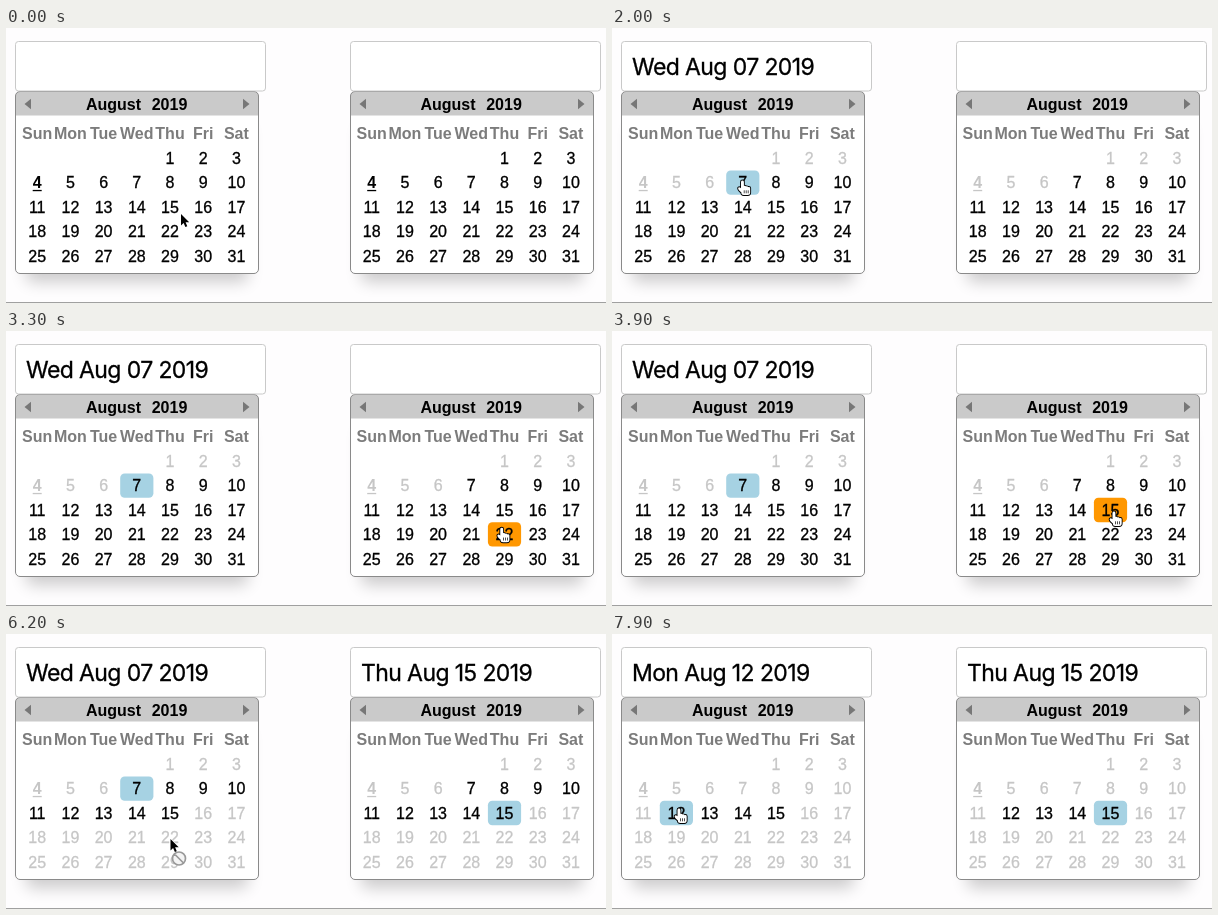
An HTML page with a canvas that plays this animation: 600 px wide and 275 px high, repeating every 8000 ms.

```html
<!DOCTYPE html>
<html lang="en">
<head>
<meta charset="utf-8">
<title>Date range picker</title>
<style>
  html, body { margin: 0; width: 100%; height: 100%; overflow: hidden; background: #fefdfe; }
  canvas { display: block; width: 600px; height: 275px; }
</style>
</head>
<body>
<canvas id="stage" width="600" height="275"></canvas>
<script>
const ctx = document.getElementById('stage').getContext('2d');

const LOOP = 8000, STEP = 100, TRAVEL = 800;
const YEAR = 2019, MONTH = 7, TODAY = 4;
const PANEL_GAP = 334.5;
const GRID = { x: 14.6, y: 118, w: 33.2, h: 24.4 };
const SANS = '"Liberation Sans", Arial, sans-serif';

const dateOf = day => new Date(YEAR, MONTH, day);
const FIRST_COLUMN = dateOf(1).getDay();
const DAYS = dateOf(32).getDate() === 1 ? 31 : 30;

// Each stop is reached at its time after an eased move
const STOPS = [
  { at: 0, x: 175, y: 186 },
  { at: 800, x: 130.5, y: 153.5 },
  { at: 2800, x: 489.5, y: 214 },
  { at: 3700, x: 502, y: 181.5 },
  { at: 4900, x: 183, y: 223 },
  { at: 5800, x: 216, y: 204 },
  { at: 6200, x: 164.5, y: 205 },
  { at: 7400, x: 67, y: 175.5 }
];

const CLICKS = [
  { at: 1400, panel: 0, day: 7 },
  { at: 4200, panel: 1, day: 15 },
  { at: 7700, panel: 0, day: 12 }
];

function pointerAt(t) {
  const next = STOPS.findIndex(stop => stop.at > t);
  if (next < 0) return STOPS[STOPS.length - 1];
  const from = STOPS[next - 1], to = STOPS[next];
  const span = Math.min(TRAVEL, to.at - from.at);
  const k = Math.max(0, 1 - (to.at - t) / span);
  const eased = k * k * (3 - 2 * k);
  return { x: from.x + (to.x - from.x) * eased, y: from.y + (to.y - from.y) * eased };
}

function selectionAt(t) {
  const selected = [0, 0];
  for (const click of CLICKS) if (t >= click.at) selected[click.panel] = click.day;
  return selected;
}

function cellOf(day) {
  const slot = day + FIRST_COLUMN - 1;
  return { x: GRID.x + GRID.w * (slot % 7), y: GRID.y + GRID.h * Math.floor(slot / 7) };
}

function dayUnder({ x, y }, offset) {
  const col = Math.floor((x - offset - GRID.x) / GRID.w);
  const row = Math.floor((y - GRID.y) / GRID.h);
  const day = row * 7 + col - FIRST_COLUMN + 1;
  return col >= 0 && col < 7 && row >= 0 && day > 0 && day <= DAYS ? day : 0;
}

function box(x, y, w, h, r, fill, stroke) {
  ctx.beginPath();
  ctx.roundRect(x, y, w, h, r);
  if (fill) { ctx.fillStyle = fill; ctx.fill(); }
  if (stroke) { ctx.strokeStyle = stroke; ctx.lineWidth = 1; ctx.stroke(); }
}

// A hairline outline thickens the regular weight slightly
function label(text, x, y, font, color, { align = 'center', outline = 0 } = {}) {
  ctx.font = font;
  ctx.fillStyle = ctx.strokeStyle = color;
  ctx.textAlign = align;
  ctx.fillText(text, x, y);
  if (outline) {
    ctx.lineWidth = outline;
    ctx.strokeText(text, x, y);
  }
}

function triangle(tip, base) {
  ctx.fillStyle = '#777';
  ctx.beginPath();
  ctx.moveTo(tip, 76);
  ctx.lineTo(base, 70.7);
  ctx.lineTo(base, 81.3);
  ctx.fill();
}

function drawInput(text) {
  box(9.5, 13.5, 250, 49.5, 3, '#fff', '#c9c9c9');
  ctx.letterSpacing = '-0.6px';
  label(text, 20, 47, '23px Inter, sans-serif', '#000', { align: 'left', outline: .3 });
  ctx.letterSpacing = '0px';
}

function drawFrame() {
  ctx.save();
  ctx.shadowColor = 'rgba(0,0,0,.2)';
  ctx.shadowBlur = 16;
  ctx.shadowOffsetY = 20;
  box(20, 78, 222, 156, 6, '#000');
  ctx.restore();
  box(9.5, 63.5, 243, 182, 4.5, '#fff');
  box(9.5, 63.5, 243, 24, [4.5, 4.5, 0, 0], '#cacaca');
  box(9.5, 63.5, 243, 182, 4.5, null, '#8a8a8a');
  triangle(18.5, 25);
  triangle(243.5, 237);
}

function drawHeadings() {
  const bold = `bold 16px ${SANS}`;
  const month = dateOf(1).toLocaleString('en-US', { month: 'long' });
  label(month, 107.5, 82, bold, '#000');
  label(YEAR, 163.5, 82, bold, '#000');
  for (let day = TODAY; day < TODAY + 7; day++)
    label(dateOf(day).toDateString().slice(0, 3), cellOf(day).x + GRID.w / 2, 111, bold, '#7c7c7c');
}

function drawDays(isEnabled, selected, hovered) {
  for (let day = 1; day <= DAYS; day++) {
    const { x, y } = cellOf(day), center = x + GRID.w / 2;
    const enabled = isEnabled(day), today = day === TODAY;
    if (day === selected) box(x, y, GRID.w, GRID.h, 4.5, '#a6d2e3');
    else if (day === hovered && enabled) box(x, y, GRID.w, GRID.h, 4.5, '#ff9700');
    label(day, center, y + 17.9, `${today ? 'bold ' : ''}16px ${SANS}`,
      enabled ? '#000' : '#c6c6c6', { outline: today ? 0 : .3 });
    if (today) ctx.fillRect(center - 4.5, y + 19.5, 9, 1.3);
  }
}

function drawHand() {
  const hand = new Path2D();
  hand.ellipse(-1.9, 8.4, 1.5, 3.2, -.7, 0, Math.PI * 2);
  hand.roundRect(-1.5, -1, 2.9, 11, 1.5);
  for (let i = 1; i < 4; i++) hand.roundRect(-1.5 + 2.1 * i, 3.6 + .6 * i, 2.9, 6, 1.4);
  hand.roundRect(-1.2, 7, 8.9, 6.6, 2.5);
  ctx.strokeStyle = '#000';
  ctx.lineWidth = 1.8;
  ctx.stroke(hand);
  ctx.fillStyle = '#fff';
  ctx.fill(hand);
  ctx.fillStyle = '#000';
  for (let i = 0; i < 3; i++) ctx.fillRect(1.3 + 2 * i, 8.8, .7, 3);
}

function drawArrow() {
  const arrow = new Path2D('M0 0V11.5L2.6 9 4.4 13 6.3 12.2 4.6 8.3H8.2Z');
  ctx.strokeStyle = '#fff';
  ctx.lineWidth = 1.5;
  ctx.stroke(arrow);
  ctx.fillStyle = '#000';
  ctx.fill(arrow);
}

function drawBlockedSign() {
  ctx.beginPath();
  ctx.arc(8.5, 19.5, 6.5, 0, Math.PI * 2);
  ctx.fillStyle = '#f4f4f4';
  ctx.fill();
  ctx.moveTo(4, 15);
  ctx.lineTo(13, 24);
  ctx.strokeStyle = '#999';
  ctx.lineWidth = 1.7;
  ctx.stroke();
}

function drawPointer({ x, y }, kind) {
  ctx.save();
  ctx.translate(x, y);
  ctx.lineJoin = 'round';
  if (kind === 'hand') drawHand();
  else drawArrow();
  if (kind === 'blocked') drawBlockedSign();
  ctx.restore();
}

function render(t) {
  const pointer = pointerAt(t), selected = selectionAt(t);
  const [start, end] = selected;
  const isEnabled = day => day >= start && (!end || day <= end);
  let kind = 'arrow';
  ctx.fillStyle = '#fefdfe';
  ctx.fillRect(0, 0, 600, 275);
  selected.forEach((day, i) => {
    const offset = PANEL_GAP * i;
    // Hovering registers only once the pointer has moved
    const hovered = t > 0 ? dayUnder(pointer, offset) : 0;
    if (hovered) kind = isEnabled(hovered) ? 'hand' : 'blocked';
    ctx.save();
    ctx.translate(Math.round(offset), 0);
    drawFrame();
    drawInput(day ? dateOf(day).toDateString() : '');
    ctx.restore();
    ctx.save();
    ctx.translate(offset, 0);
    drawHeadings();
    drawDays(isEnabled, day, hovered);
    ctx.restore();
  });
  ctx.fillStyle = '#a0a0a0';
  ctx.fillRect(0, 274, 600, 1);
  drawPointer(pointer, kind);
}

function tick() {
  const t = performance.now() % LOOP;
  render(Math.floor(t / STEP) * STEP);
  requestAnimationFrame(tick);
}
tick();
</script>
</body>
</html>
```
